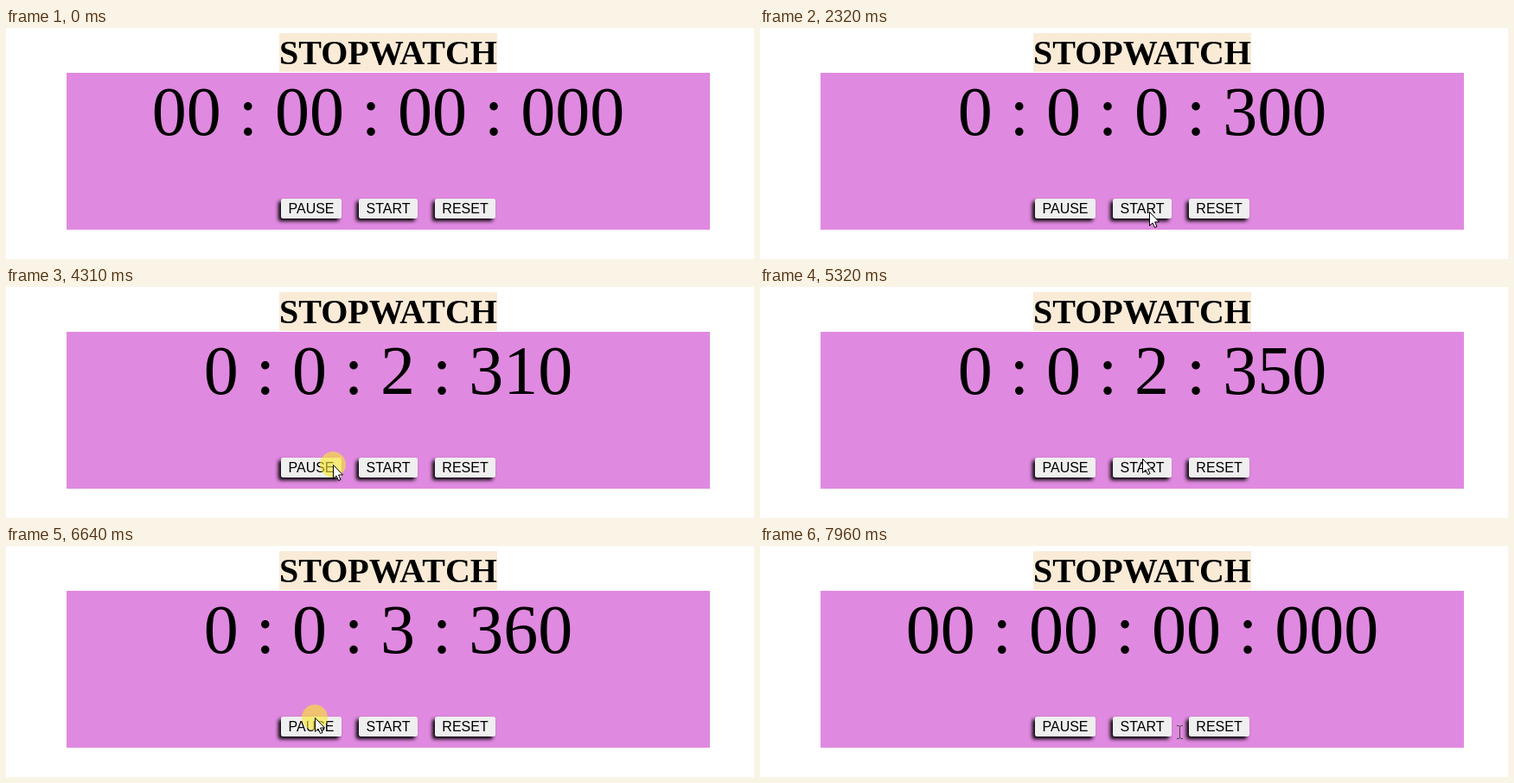
An HTML page that plays this animation: 865x268 px, repeating every 8000 ms.

```html
<!DOCTYPE html>
<html lang="en">
<head>
<meta charset="utf-8">
<title>Stopwatch</title>
<style>
  html, body { margin: 0; width: 100%; height: 100%; overflow: hidden; background: #fff; }
  svg { display: block; width: 865px; height: 268px; }
  text { text-anchor: middle; }
  .title { font: bold 40px "Liberation Serif", serif; }
  .time { font: 80px "Liberation Serif", serif; }
  .label { font: 16px "Liberation Sans", sans-serif; }
  .button { fill: #efefef; filter: drop-shadow(-3px 3px 2px #000); }
</style>
</head>
<body>
<svg viewBox="0 0 865 268">
  <rect x="316" y="6" width="252" height="45" fill="#faebd7"/>
  <text class="title" x="442" y="42">STOPWATCH</text>
  <rect x="70" y="52" width="744" height="182" fill="#e089e0"/>
  <text class="time" id="time" x="442" y="124"></text>

  <rect class="button" x="318" y="198" width="70" height="23" rx="2.5"/>
  <text class="label" x="353" y="215">PAUSE</text>
  <rect class="button" x="408" y="198" width="68" height="23" rx="2.5"/>
  <text class="label" x="442" y="215">START</text>
  <rect class="button" x="496" y="198" width="70" height="23" rx="2.5"/>
  <text class="label" x="531" y="215">RESET</text>

  <g id="pointer">
    <circle id="click" r="15" fill="rgba(250,232,40,.6)"/>
    <path id="arrow" d="M.5 .5V16.5L4 13L6.5 18.5L9 17.5L6.6 12H11.5Z" fill="#fff" stroke="#000"/>
    <path id="beam" d="M-3 -6.5H-1L.5 -5.5L2 -6.5H4M.5 -5.5V7.5M-3 8.5H-1L.5 7.5L2 8.5H4" fill="none" stroke="#3c503c"/>
  </g>
</svg>
<script>
const LOOP = 8000;
const RESET = -1;

// The screen refreshes in steps: [start, stopwatch ms, pointer x, y, pointer kind]
const steps = [
  [0, RESET, 0, 0, 'none'],
  [670, RESET, 612, 214, 'arrow'],
  [1000, RESET, 533, 221, 'arrow'],
  [1330, RESET, 439, 191, 'arrow'],
  [1660, RESET, 447, 217, 'arrow'],
  [1990, RESET, 447, 217, 'click'],
  [2320, 300, 450, 213, 'arrow'],
  [2650, 640, 450, 213, 'arrow'],
  [2980, 970, 450, 213, 'arrow'],
  [3320, 1300, 439, 211, 'arrow'],
  [3650, 1640, 439, 211, 'arrow'],
  [3980, 1960, 384, 207, 'arrow'],
  [4310, 2310, 378, 206, 'click'],
  [4650, 2350, 378, 206, 'arrow'],
  [5320, 2350, 442, 199, 'arrow'],
  [5650, 2350, 457, 204, 'click'],
  [5980, 2680, 457, 204, 'arrow'],
  [6310, 3020, 370, 199, 'arrow'],
  [6640, 3360, 357, 199, 'click'],
  [6970, 3400, 484, 193, 'arrow'],
  [7300, 3400, 509, 201, 'arrow'],
  [7630, RESET, 532, 208, 'arrow'],
  [7960, RESET, 485, 215, 'beam'],
];

const el = id => document.getElementById(id);
const show = (id, on) => el(id).setAttribute('visibility', on ? 'visible' : 'hidden');

const format = ms => ms === RESET
  ? '00 : 00 : 00 : 000'
  : `0 : 0 : ${Math.floor(ms / 1000)} : ${ms % 1000}`;

function draw() {
  const t = performance.now() % LOOP;
  const [, ms, x, y, kind] = steps.findLast(([start]) => start <= t);
  el('time').textContent = format(ms);
  el('pointer').setAttribute('transform', `translate(${x} ${y})`);
  show('click', kind === 'click');
  show('arrow', kind === 'arrow' || kind === 'click');
  show('beam', kind === 'beam');
  requestAnimationFrame(draw);
}
draw();
</script>
</body>
</html>
```
